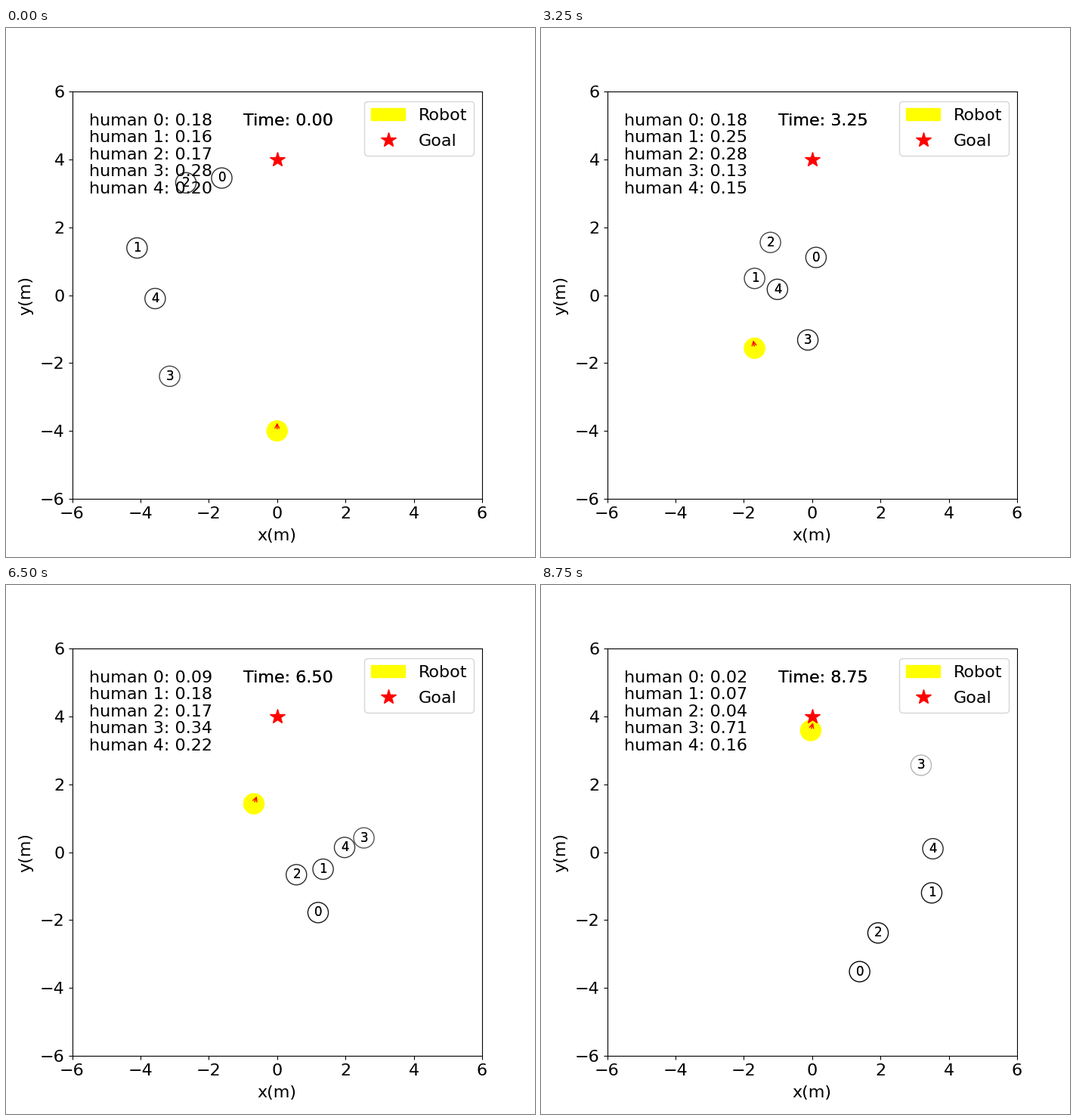
A matplotlib script for the animation above (9000 ms loop, 700 by 700 pixels).

```python
import matplotlib.pyplot as plt
import numpy as np
from matplotlib.animation import FuncAnimation
from matplotlib.lines import Line2D
from matplotlib.patches import ArrowStyle, Circle, FancyArrowPatch

STEPS = 36
STEP_MS = 250
RADIUS = 0.3
LABEL_OFFSET = 0.11


def smooth(*keys):
    """Cubic Hermite curve through (step, value, ...) keys, one row per step."""
    keys = np.array(keys, dtype=float)
    t, p = keys[:, 0], keys[:, 1:]
    m = np.gradient(p, t, axis=0)
    steps = np.arange(STEPS)
    i = np.clip(np.searchsorted(t, steps, side="right") - 1, 0, len(t) - 2)
    h = (t[i + 1] - t[i])[:, None]
    u = (steps - t[i])[:, None] / h
    return ((1 + 2 * u) * (1 - u) ** 2 * p[i] + u * (1 - u) ** 2 * h * m[i]
            + u ** 2 * (3 - 2 * u) * p[i + 1] + u ** 2 * (u - 1) * h * m[i + 1])


# Walks in metres: start, turning points and end as (step, x, y)
robot_path = smooth((0, 0, -4), (9, -1.43, -2.48), (15, -1.715, -1.09),
                    (26, -0.68, 1.425), (35, -0.04, 3.585))
human_paths = [
    smooth((0, -1.62, 3.45), (17, 0.54, 0.3), (26, 1.2, -1.78),
           (31, 1.51, -2.99), (35, 1.39, -3.52)),
    smooth((0, -4.1, 1.39), (9, -2.495, 0.78), (35, 3.5, -1.2)),
    smooth((0, -2.67, 3.31), (17, -0.725, 0.945), (35, 1.93, -2.38)),
    smooth((0, -3.145, -2.39), (17, 0.745, -0.88), (26, 2.54, 0.42), (35, 3.19, 2.56)),
    smooth((0, -3.57, -0.1), (17, -0.16, 0.21), (31, 3.225, 0.1),
           (33, 3.73, 0.1), (35, 3.535, 0.1)),
]

# Attention scores add up to one, so human 3 takes what the others leave
others = smooth((0, 0.184, 0.164, 0.174, 0.198), (9, 0.203, 0.243, 0.233, 0.15),
                (17, 0.15, 0.24, 0.31, 0.17), (26, 0.09, 0.18, 0.17, 0.22),
                (35, 0.02, 0.07, 0.04, 0.16))
scores = np.insert(others, 3, 1 - others.sum(axis=1), axis=1)

# The robot starts facing up, then faces the way it has just moved
facing = np.diff(robot_path, axis=0, prepend=robot_path[:1] - [[0, 1]])
facing /= np.linalg.norm(facing, axis=1, keepdims=True)

fig, ax = plt.subplots(figsize=(7, 7), dpi=100)
ax.tick_params(labelsize=16)
ax.set(xlim=(-6, 6), ylim=(-6, 6))
ax.set_xlabel("x(m)", fontsize=16, labelpad=7)
ax.set_ylabel("y(m)", fontsize=16, labelpad=6)

robot = ax.add_artist(Circle(robot_path[0], RADIUS, color="yellow"))
goal = ax.add_artist(Line2D([0], [4], color="red", marker="*",
                            linestyle="None", markersize=15))
ax.legend([robot, goal], ["Robot", "Goal"], fontsize=16, loc="upper right",
          bbox_to_anchor=(1, 0.997), labelspacing=0.635)


def strong_text(x, y, s, size):
    """Text drawn twice, which gives slightly heavier edges."""
    return [ax.text(x, y, s, fontsize=size) for _ in range(2)]


humans = [ax.add_artist(Circle(path[0], RADIUS, fill=False)) for path in human_paths]
numbers = [strong_text(0, 0, str(i), 12) for i in range(len(humans))]
score_texts = [ax.text(-5.5, 5 - 0.5 * i, "", fontsize=16) for i in range(len(humans))]
clock = strong_text(-1, 5, "", 16)
arrow = ax.add_artist(FancyArrowPatch(
    (0, 0), (0, 1), color="red",
    arrowstyle=ArrowStyle("->", head_length=4, head_width=2)))


def update(k):
    pos = robot_path[k]
    robot.center = pos
    arrow.set_positions(tuple(pos), tuple(pos + RADIUS * facing[k]))

    for i, human in enumerate(humans):
        x, y = human_paths[i][k]
        human.center = (x, y)
        human.set_color(str(scores[k, i]))
        for label in numbers[i]:
            label.set_position((x - LABEL_OFFSET, y - LABEL_OFFSET))
        score_texts[i].set_text(f"human {i}: {scores[k, i]:.2f}")

    for label in clock:
        label.set_text(f"Time: {k * STEP_MS / 1000:.2f}")


anim = FuncAnimation(fig, update, frames=STEPS, interval=STEP_MS,
                     repeat=True, repeat_delay=0)
plt.show()
```
